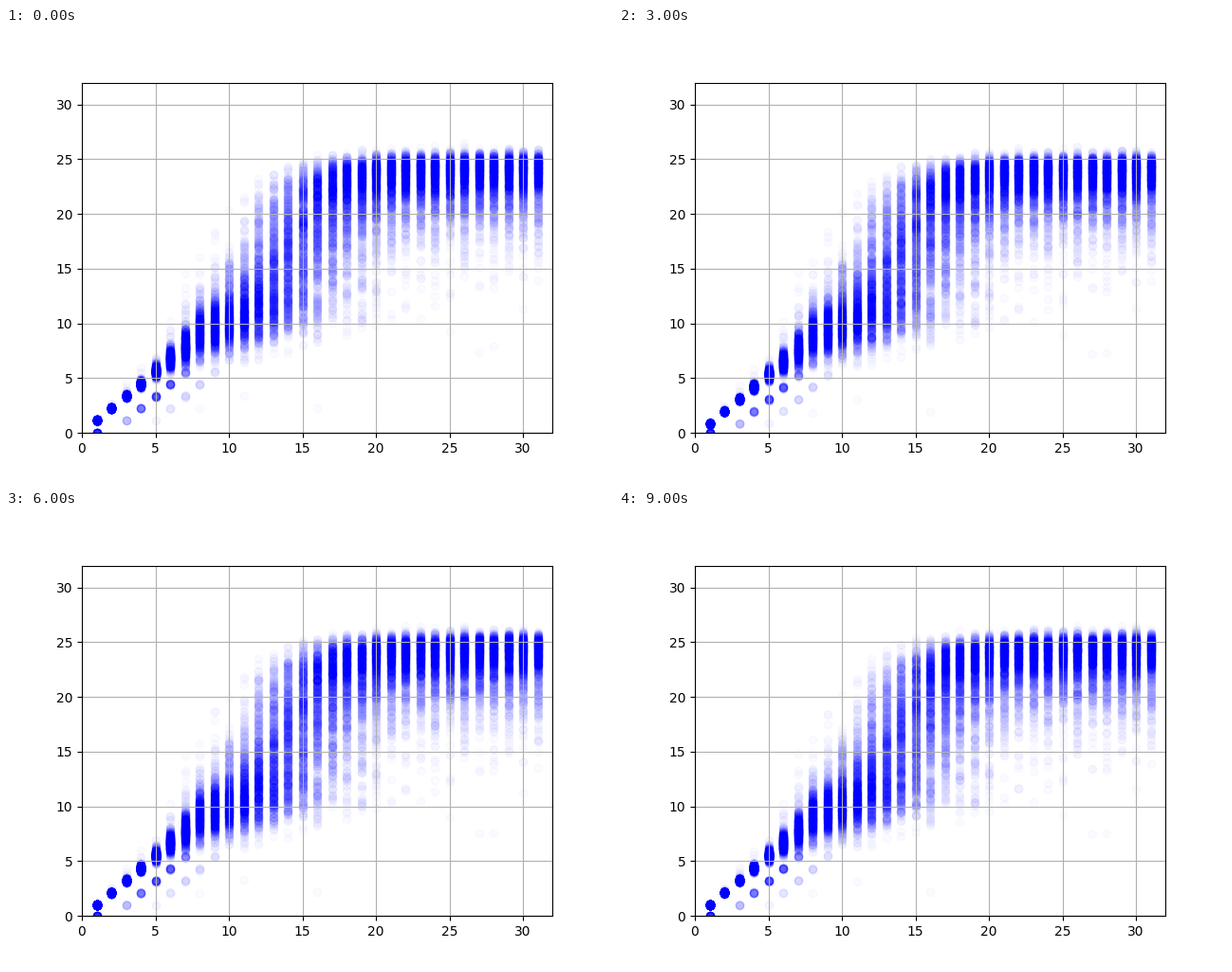
Recreate the animation shown at these times as a matplotlib script. Size 640 px wide and 480 px high, loop 10 s.

```python
import numpy as np
import matplotlib.pyplot as plt
from matplotlib.animation import FuncAnimation

FRAMES = 10
PER_COLUMN = 750
STEP = 1.1
CAP = 24.9


def column(x, rng):
    """Values follow a line at first, then take off towards the cap."""
    def normal():
        return rng.standard_normal(PER_COLUMN)

    line = STEP * min(x, 8.2) + 0.15 * max(x - 8.2, 0)
    line = line * (1 + min(0.002 * x * x, 0.12) * normal())
    start = 12.5 + 1.6 * normal() + rng.exponential(2, PER_COLUMN)
    cap = CAP + 0.35 * normal() - rng.exponential(1.8, PER_COLUMN)
    rise = 1 / (1 + np.exp((start - x) / 1.5))
    return line + (cap - line) * rise


def bump(x, mid, width):
    return np.exp(-((x - mid) / width) ** 2)


def clusters():
    """Small groups lying whole steps below the main band: (x, step, count)."""
    yield 1, 0, 70
    for x in range(3, 11):
        yield x, x - 2, round(50 * bump(x, 5.3, 2))
        if x > 4:
            yield x, x - 4, round(8 * bump(x, 7.5, 2))
    for x, k in [(8, 2), (11, 3), (16, 2)]:
        yield x, k, 1


def base_points():
    rng = np.random.default_rng(7)
    xs, ys = [], []
    for x in range(1, 32):
        xs.append(np.full(PER_COLUMN, x))
        ys.append(column(x, rng))
    for x, k, n in clusters():
        xs.append(np.full(n, x))
        ys.append(np.full(n, k * STEP))
    return np.concatenate(xs), np.concatenate(ys)


X, Y = base_points()
NEAR_ZERO = np.minimum(Y, 1)
HIGH = np.clip(Y / 24, 0, 1) ** 2

fig, ax = plt.subplots(figsize=(6.4, 4.8), dpi=100)
dots = ax.scatter(X, Y, color="blue", alpha=0.02)
ax.set_xlim(0, 32)
ax.set_ylim(0, 32)
ax.grid(True)


def update(i):
    rng = np.random.default_rng(100 + i)
    # Small values dip once; large ones sway.
    low_shift = 0.05 - 0.34 * bump(i, 3.9, 1.6) - 0.015 * i
    high_shift = 0.2 + 0.25 * np.cos(2 * np.pi * (i - 1.2) / 4.2)
    shift = (1 - HIGH) * low_shift + HIGH * high_shift
    noise = rng.standard_normal(Y.size) * (0.02 + 0.01 * Y)
    dots.set_offsets(np.column_stack([X, Y + NEAR_ZERO * (shift + noise)]))
    return dots,


anim = FuncAnimation(fig, update, frames=FRAMES, interval=1000, repeat=True,
                     repeat_delay=0)
plt.show()
```
